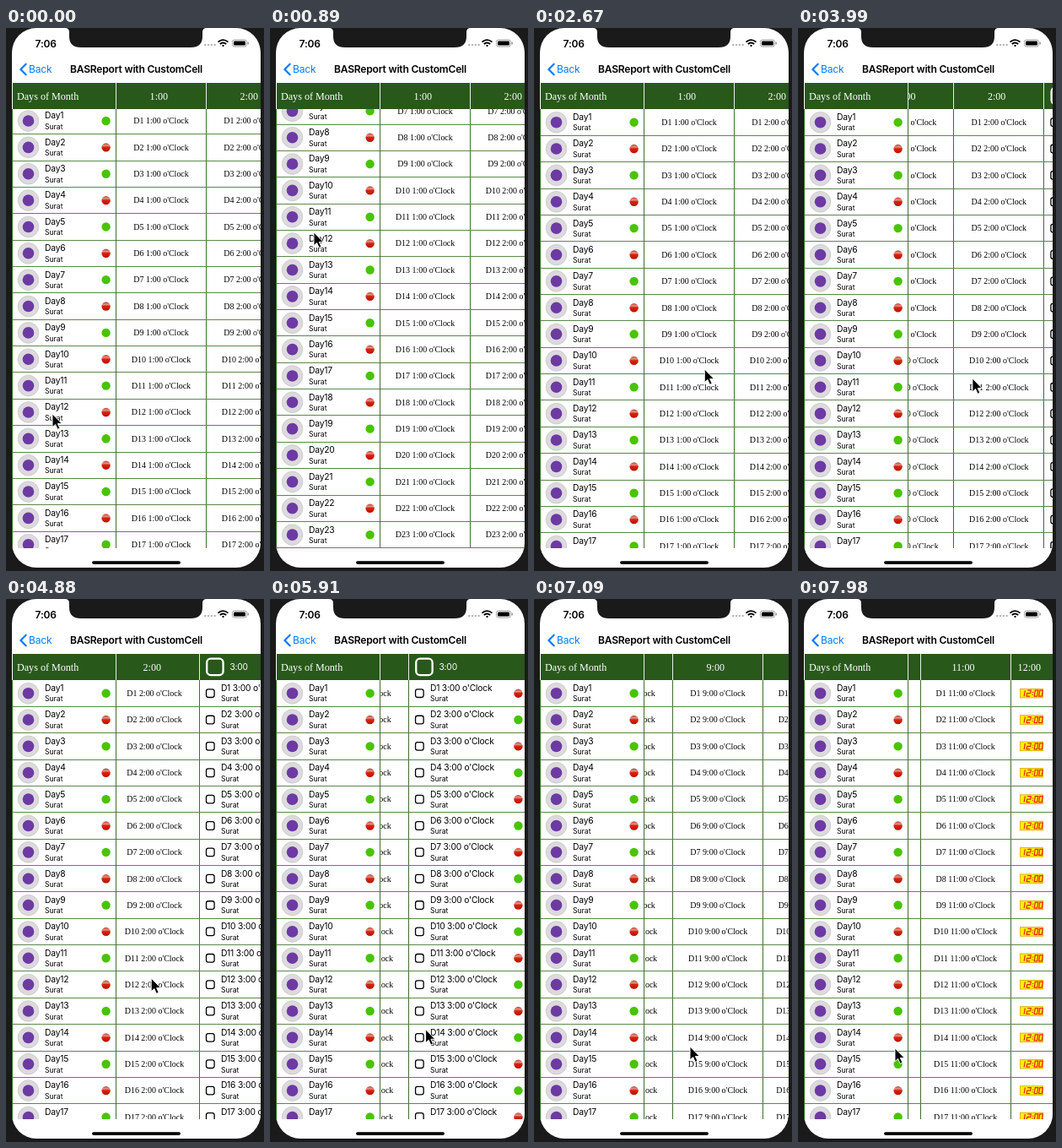
Animation, 306 px wide and 643 px high, one loop 8 s. Source, as an HTML page:

```html
<!DOCTYPE html>
<html lang="en">
<head>
<meta charset="utf-8">
<title>Report table</title>
<style>
html, body { margin: 0; width: 100%; height: 100%; overflow: hidden; background: #1a1a1a; }
body > svg { display: block; width: 306px; height: 643px; }
text { font-family: Inter, sans-serif; letter-spacing: -.02em; white-space: pre; }
.serif { font: 9.98px "Liberation Serif", serif; letter-spacing: 0; text-anchor: middle; }
.head { font-size: 12.1px; fill: #fff; }
.day { font-size: 10.3px; }
.city { font-size: 8.6px; letter-spacing: 0; }
.nav { font-size: 12.1px; }
.bold { font-weight: 600; letter-spacing: -.018em; }
.rule, .edge, .white { stroke-width: 1; shape-rendering: crispEdges; }
.rule { stroke: #5c874e; }
.edge { stroke: #3f6d33; }
.white { stroke: #e8efe4; }
</style>
</head>
<body>
<svg viewBox="0 0 306 643">
  <defs>
    <linearGradient id="ball" x2="0" y2="1">
      <stop offset="0" stop-color="#c2402f"/>
      <stop offset=".3" stop-color="#dc9488"/>
      <stop offset=".48" stop-color="#d8230d"/>
      <stop offset="1" stop-color="#b81200"/>
    </linearGradient>
    <g id="clock">
      <rect x="-13.5" y="-5.3" width="27" height="10.6" fill="#ffee08" stroke="#d9a400" stroke-width=".8"/>
      <path transform="translate(-9.8 -3.5) skewX(-9)" fill="none" stroke="#e02a10" stroke-width="1.2"
        d="M2 0V7M5 0H9V3.5H5V7H9M11.7 1.8v1M11.7 4.6v1M14 0h3.5v7H14zM19.5 0H23v7h-3.5z"/>
    </g>
    <g id="avatar">
      <circle r="12.3" fill="#dcdadd" stroke="#c2c0c4" stroke-width=".7"/>
      <circle r="6.8" fill="#6c3aa2"/>
    </g>
  </defs>

  <rect x="7" y="0" width="295" height="639" rx="29" fill="#fff"/>
  <path d="M70 0Q75 0 75 5V10Q75 23 89 23H219Q233 23 233 10V5Q233 0 238 0Z" fill="#1a1a1a"/>
  <text class="bold" x="34.6" y="22.5" font-size="12">7:06</text>
  <g fill="#b5b5b5">
    <circle cx="236.2" cy="20" r="1.2"/><circle cx="240" cy="20" r="1.2"/>
    <circle cx="243.8" cy="20" r="1.2"/><circle cx="247.6" cy="20" r="1.2"/>
  </g>
  <g fill="none" stroke="#000" stroke-width="1.8">
    <path d="M251.5 16.6Q257.5 11.6 263.5 16.6M253.8 19Q257.5 16 261.2 19"/>
    <path d="M257.5 22.4L255.9 20.6Q257.5 19.5 259.1 20.6Z" fill="#000" stroke="none"/>
    <rect x="268.5" y="14" width="17" height="8" rx="2.4" stroke="#8a8a8a" stroke-width=".8"/>
    <rect x="270" y="15.5" width="14" height="5" rx="1.2" fill="#000" stroke="none"/>
    <path d="M287.2 16.6v2.8" stroke="#8a8a8a" stroke-width="1.2"/>
  </g>
  <path d="M23.6 42.7L17.4 49L23.6 55.3" fill="none" stroke="#0a7aff" stroke-width="2.3" stroke-linecap="round" stroke-linejoin="round"/>
  <text class="nav" x="27" y="53.3" fill="#0a7aff">Back</text>
  <text class="nav bold" x="154.5" y="53.3" text-anchor="middle">BASReport with CustomCell</text>

  <rect x="8" y="65" width="294" height="31" fill="#29581b"/>
  <text class="serif head" x="13" y="84.7" style="text-anchor:start">Days of Month</text>
  <svg x="131" y="65" width="171" height="31"><g id="heads"></g></svg>
  <path class="white" d="M130.5 65V96"/>

  <svg x="7" y="96" width="124" height="520"><g id="days"></g></svg>
  <svg x="131" y="96" width="171" height="520"><g id="cells"></g></svg>
  <path class="edge" d="M130.5 96V616M7.5 96V616"/>
  <rect x="102" y="631.2" width="105" height="3.7" rx="1.8"/>

  <path id="cursor" d="M0 0V15.6L3.6 12.4L6.2 18.2L8.9 17L6.3 11.4H11.2Z" stroke="#fff" stroke-width=".9"/>
</svg>

<script>
const ROW = 31.36, WIDE = 106.9, DAYS = 31, HOURS = 12;
const LOOP = 8000, TICK = 147.7;
const $ = id => document.getElementById(id);

const text = (cls, x, y, s) => `<text class="${cls}" x="${x}" y="${y}">${s}</text>`;
const line = (cls, d) => `<path class="${cls}" d="${d}"/>`;
const light = (x, y, on) =>
  `<circle cx="${x}" cy="${y}" r="5.2" fill="${on ? '#49c304' : 'url(#ball)'}"/>`;
const box = (x, y, size, r, color, w) =>
  `<rect x="${x}" y="${y - size / 2}" width="${size}" height="${size}" rx="${r}" fill="none" stroke="${color}" stroke-width="${w}"/>`;
const twoLines = (x, mid, title) =>
  text('day', x, mid - 2.6, title) + text('city', x, mid + 9.8, 'Surat');

const colWidth = h => h === 3 ? 142.5 : h === HOURS ? 50 : WIDE;

function cell(h, d, x, mid) {
  const label = `D${d} ${h}:00 o'Clock`;
  if (h === 3)
    return box(x + 8.1, mid, 9.6, 2.4, '#000', 1.3) + twoLines(x + 25.5, mid, label) +
      light(x + 130, mid, d % 2 === 0);
  if (h === HOURS) return `<use href="#clock" x="${x + 25}" y="${mid}"/>`;
  return text('serif', x + WIDE / 2, mid + 3.3, label);
}

function build() {
  let heads = '', cells = '', days = '', x = -.4;
  const tall = ROW * DAYS;
  for (let h = 1; h <= HOURS; h++) {
    const w = colWidth(h);
    heads += h === 3
      ? box(x + 8.8, 15.4, 19.4, 4.6, '#fff', 2.3) +
        `<text class="day" x="${x + 36}" y="19.2" fill="#fff">3:00</text>`
      : text('serif head', x + w / 2 - 2.7, 19.7, h + ':00');
    for (let d = 1; d <= DAYS; d++) cells += cell(h, d, x, (d - .5) * ROW);
    x += w;
    heads += line('white', `M${x} 0V32`);
    cells += line('edge', `M${x} 0V${tall}`);
  }
  for (let d = 1; d <= DAYS; d++) {
    const mid = (d - .5) * ROW, y = d * ROW;
    days += `<use href="#avatar" x="19.5" y="${mid}"/>` + twoLines(39, mid, 'Day' + d) +
      light(111.6, mid, d % 2) + line('rule', `M0 ${y}H124`);
    cells += line('rule', `M0 ${y}H${x}`);
  }
  $('heads').innerHTML = heads;
  $('cells').innerHTML = cells;
  $('days').innerHTML = days;
}

// Eased progress from 0 to 1 between two times
function ease(t, from, to) {
  const u = Math.min(1, Math.max(0, (t - from) / (to - from)));
  return u * u * (3 - 2 * u);
}

const scrollY = t => 201.5 * (ease(t, -34, 600) - ease(t, 900, 1500));
const scrollX = t =>
  115 * ease(t, 3540, 4490) + 484 * ease(t, 5600, 6940) + 491 * ease(t, 6180, 7940);

// Hand moves: start, end, dx, dy
const moves = [
  [0, 600, -3, -215],
  [900, 1500, 18, 360],
  [1550, 2060, 131, -198],
  [2600, 3260, 58.5, 1],
  [3540, 4490, -115, 22],
  [4490, 5600, 100.5, 80],
  [5600, 6240, -128, 6],
  [6240, 6800, 109.5, 16],
  [6800, 7500, -111.5, 3]
];
const pointer = t => moves.reduce(([x, y], [from, to, dx, dy]) => {
  const e = ease(t, from, to);
  return [x + dx * e, y + dy * e];
}, [55, 457]);

const move = (id, x, y) => $(id).setAttribute('transform', `translate(${x} ${y})`);

function draw() {
  // The screen refreshes in steps
  const t = Math.floor(performance.now() % LOOP / TICK) * TICK;
  const sx = scrollX(t), sy = scrollY(t);
  move('heads', -sx, 0);
  move('cells', -sx, -sy);
  move('days', 0, -sy);
  move('cursor', ...pointer(t));
  requestAnimationFrame(draw);
}

build();
draw();
</script>
</body>
</html>
```
